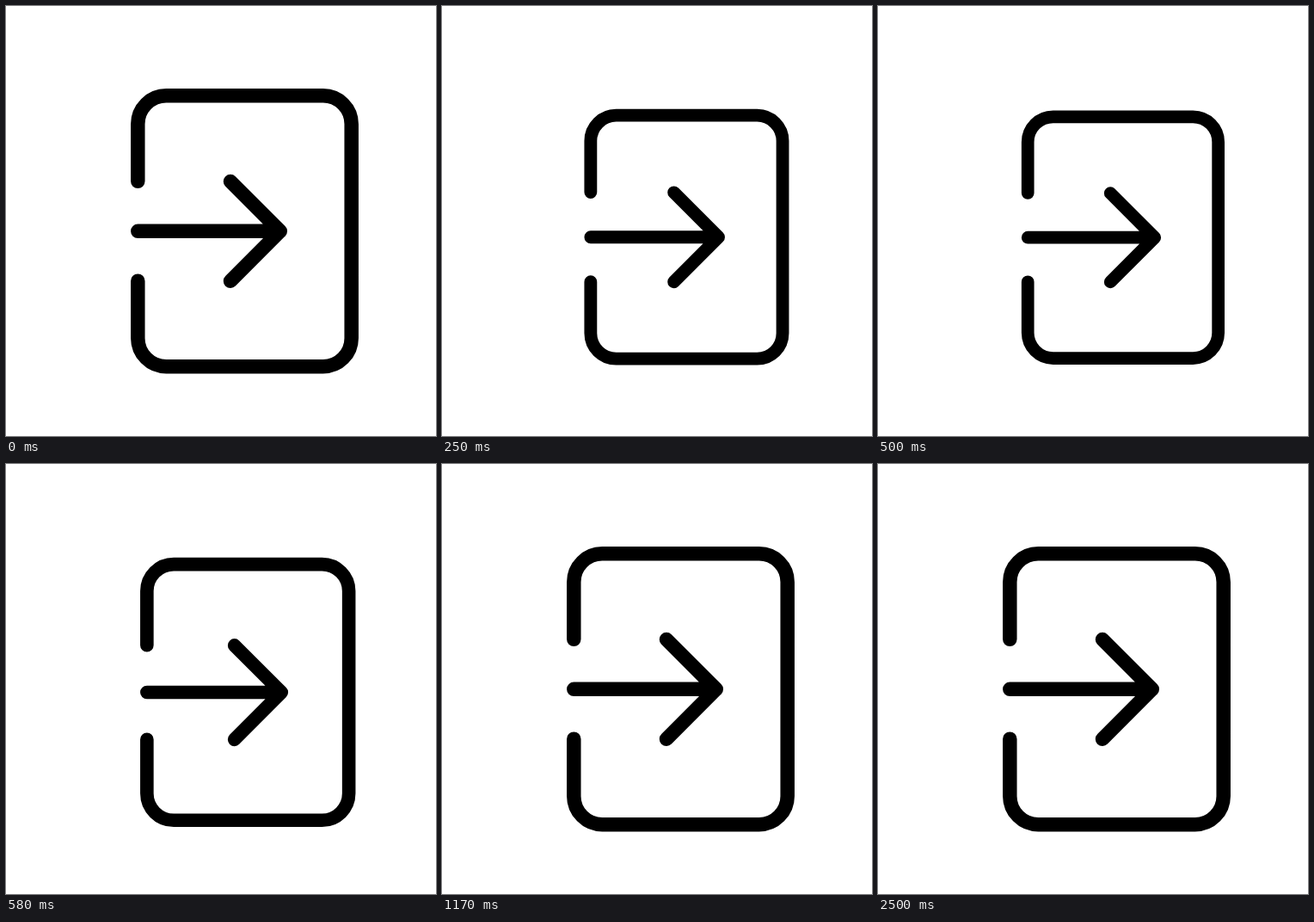
Write an HTML page that moves like this. It is 500 by 500 pixels and loops after 2.58 s.

```html
<!DOCTYPE html>
<html lang="en">
<head>
<meta charset="utf-8">
<title>Enter icon</title>
<style>
  html, body { margin: 0; width: 100%; height: 100%; overflow: hidden; background: #fff; }
  svg { display: block; width: 100%; height: 100%; }
</style>
</head>
<body>
<svg viewBox="0 0 500 500">
  <g id="icon" fill="none" stroke="#000" stroke-width="16.5" stroke-linecap="round" stroke-linejoin="round">
    <path d="M153.3 203.8V137.3a33 33 0 0 1 33-33H368.7a33 33 0 0 1 33 33V386.2a33 33 0 0 1-33 33H186.3a33 33 0 0 1-33-33V319.7"/>
    <path d="M153.3 261.8H318.8M261 204l57.8 57.8L261 319.8"/>
  </g>
</svg>
<script>
  const LOOP = 2580, STEPS = 31, HALF = 385, DEPTH = 0.12;
  const PIVOT = { x: 346, y: 330 };
  const icon = document.getElementById('icon');

  // cubic-bezier(.7, 0, .3, 1), solved by bisection
  function ease(u) {
    if (u <= 0) return 0;
    if (u >= 1) return 1;
    let lo = 0, hi = 1, s = u;
    for (let i = 0; i < 24; i++) {
      s = (lo + hi) / 2;
      const x = 2.1 * (1 - s) ** 2 * s + 0.9 * (1 - s) * s * s + s ** 3;
      if (x < u) lo = s; else hi = s;
    }
    return s * s * (3 - 2 * s);
  }

  function render(ms) {
    // Poses hold for one twelfth of a second; switches land on 10 ms ticks.
    const step = LOOP / STEPS;
    const t = Math.floor(((ms % LOOP) + 5) / step) % STEPS * step;
    const press = ease(1 - Math.abs(t - HALF) / HALF);
    const scale = 1 - DEPTH * press;
    icon.setAttribute('transform',
      `translate(${PIVOT.x} ${PIVOT.y}) scale(${scale}) translate(${-PIVOT.x} ${-PIVOT.y})`);
  }

  const start = performance.now();
  function tick() {
    render(performance.now() - start);
    requestAnimationFrame(tick);
  }
  tick();
</script>
</body>
</html>
```
